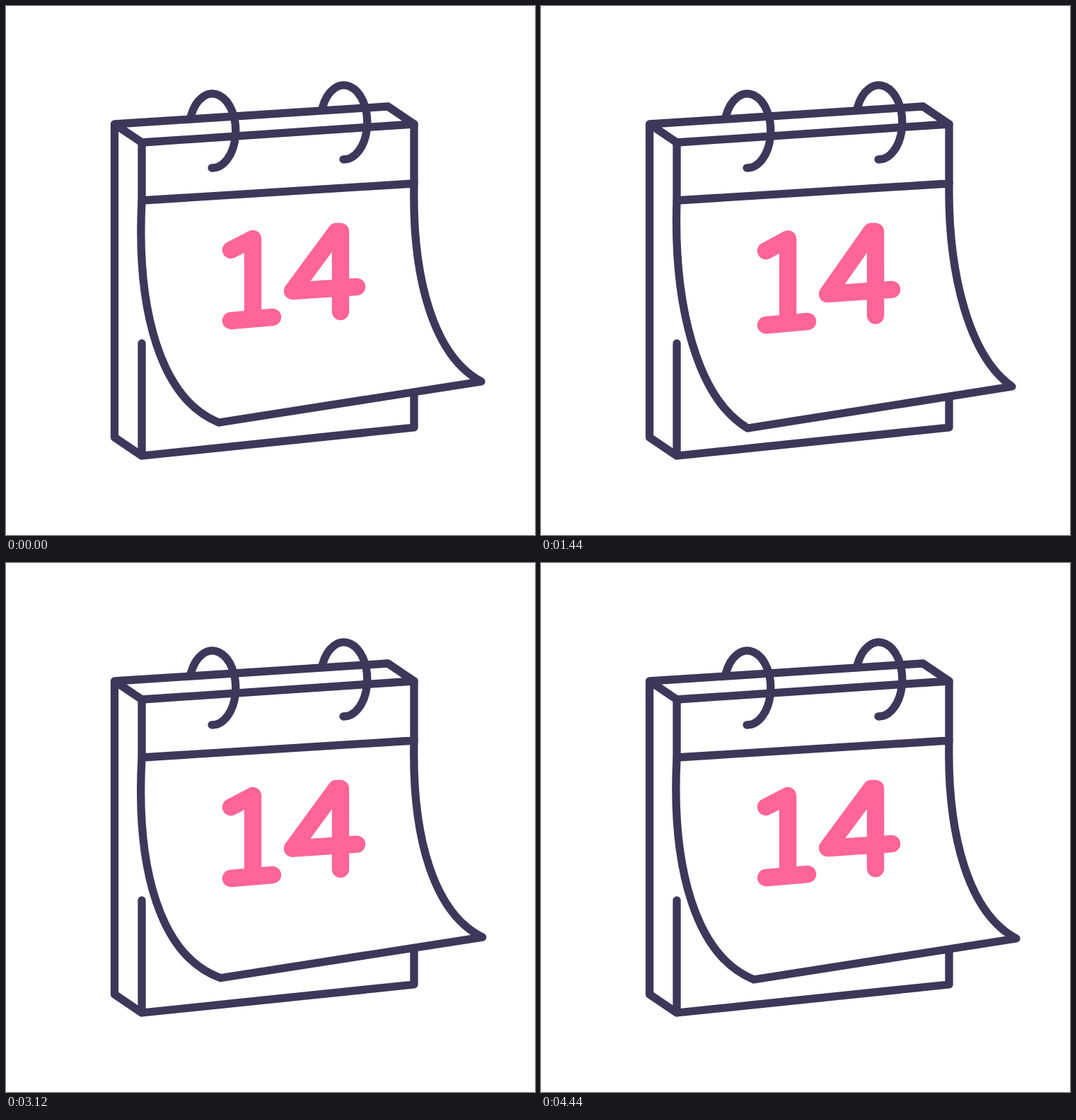
Write an HTML page that moves like this. It is 748 by 748 pixels and loops after 5.04 s.

```html
<!DOCTYPE html>
<html lang="en">
<head>
<meta charset="utf-8">
<title>Calendar</title>
<style>
  html, body { margin: 0; width: 100%; height: 100%; overflow: hidden; background: #fff; }
  svg { display: block; width: 100vw; height: 100vh; }
  path { fill: none; stroke: #3e375a; stroke-width: 11.3; stroke-linecap: round; stroke-linejoin: round; }
  #sheet { fill: #fff; }
  #digits { stroke: #ff6596; stroke-width: 24.4; }
</style>
</head>
<body>
<svg viewBox="0 0 748 748">
  <path d="M577 530V596L192 636L153.5 610V167L540 142L577 167L192 193L153.5 167M192 477V636"/>
  <path id="sheet"/>
  <path d="M192 193V275L577 251V167"/>
  <path d="M261.5 155.5A33 52.5 0 1 1 291 229M447.5 143.5A33 52.5 0 1 1 477 217"/>
  <path id="digits"/>
</svg>
<script>
  const LOOP = 5040, STEP = 40, ACTIVE = 4440;
  const DELAY = 60, PERIOD = 1060;
  const DIPS = [1.12, 0.79, 0.7, 0.25]; // depth of each swing

  const sheet = document.getElementById('sheet');
  const digits = document.getElementById('digits');

  // 0 at the top of a swing, its depth at the bottom
  function dipAt(t) {
    const swing = (t - DELAY) / PERIOD;
    const depth = DIPS[Math.floor(swing)] || 0;
    return depth * (1 - Math.cos(2 * Math.PI * swing)) / 2;
  }

  // slow rise of the sheet under the swings
  function liftAt(t) {
    return 0.22 * Math.sin(Math.PI * Math.min(t / ACTIVE, 1));
  }

  // sag: 0 at rest, 1 at the lowest pose
  function sheetPath(sag) {
    const p = (x, y, dx, dy) => `${x + dx * sag} ${y + dy * sag} `;
    return 'M192 275C' + p(184, 432, 9, -27) + p(219, 556, 5, -4) + p(301, 589, -26, 24) +
      'L' + p(672, 531, -18, 21) +
      'C' + p(606, 496, 1, 1) + p(574, 388, 4, -21) + '577 251';
  }

  function digitPath(dip) {
    const y = v => 320 + (v - 320) * (1 + 0.096 * dip);
    return `M318 ${y(345)}L349 ${y(329)}V${y(442)}M318 ${y(445)}L377 ${y(440)}` +
      `M473 ${y(432)}V${y(319)}H467L405 ${y(403)}L496 ${y(397)}`;
  }

  function draw(now) {
    const t = Math.floor((now % LOOP) / STEP) * STEP;
    const dip = dipAt(t);
    sheet.setAttribute('d', sheetPath(dip - liftAt(t)));
    digits.setAttribute('d', digitPath(dip));
  }

  const start = performance.now();
  function tick() {
    draw(performance.now() - start);
    requestAnimationFrame(tick);
  }
  tick();
</script>
</body>
</html>
```
